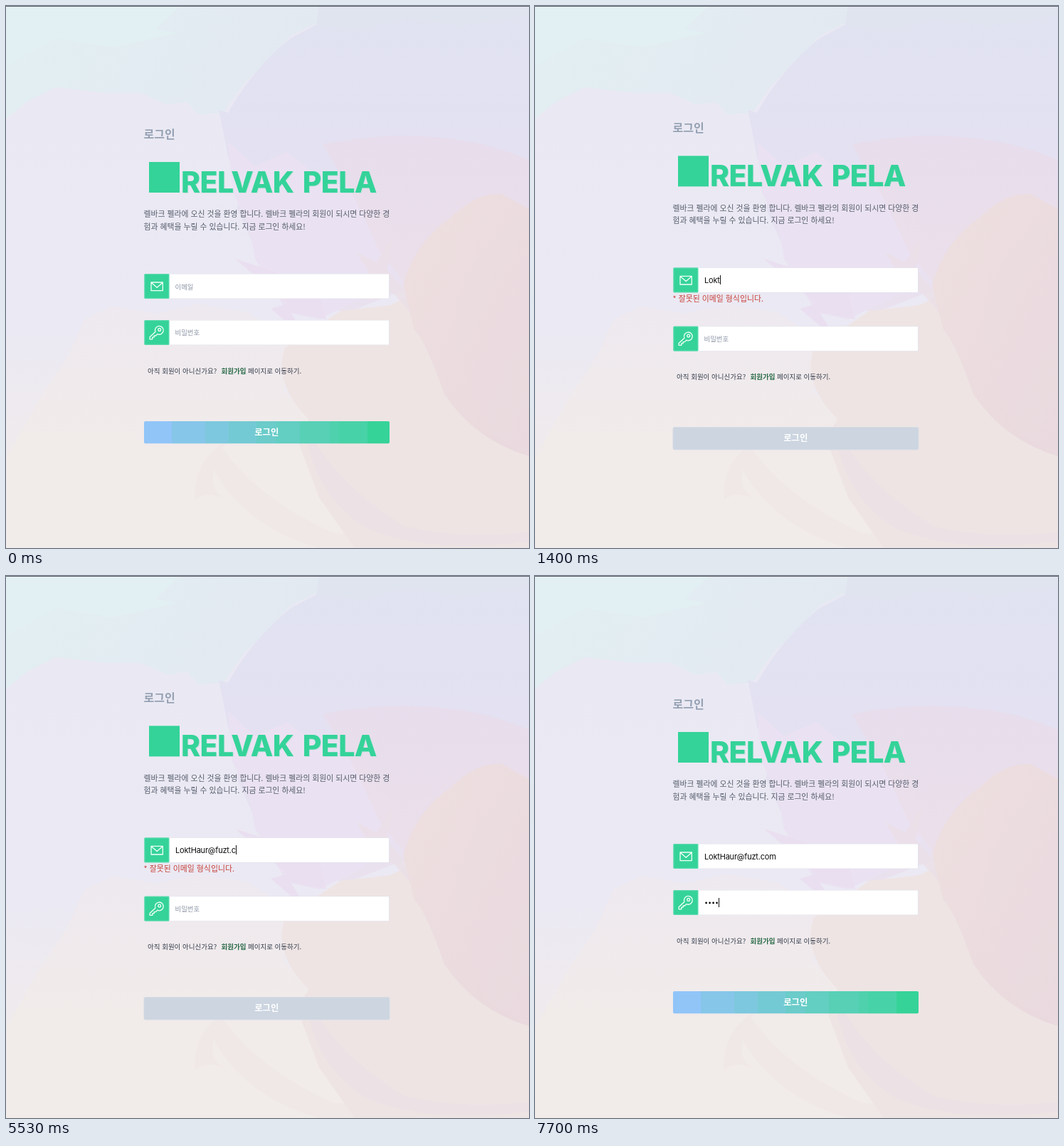
Write an HTML page that moves like this. It is 735 px wide and 761 px high and loops after 8 s.

```html
<!DOCTYPE html>
<html lang="ko">
<head>
<meta charset="utf-8">
<title>로그인</title>
<style>
  html, body { margin: 0; width: 100%; height: 100%; overflow: hidden; background: #ebe9f3; }
  svg { display: block; width: 100vw; height: 100vh; }
  text { font-family: "Noto Sans CJK KR", "Noto Sans CJK", sans-serif; white-space: pre; }
  .title { font-size: 16px; font-weight: 700; fill: #94a0b3; }
  .brand { font: 800 41px Inter, sans-serif; letter-spacing: -.6px; word-spacing: 4px; }
  .body { font-size: 10.85px; fill: #555d6c; }
  .hint { font-size: 9.4px; fill: #8b94a5; }
  .typed { font: 11px Inter, sans-serif; letter-spacing: -.2px; fill: #0c0c0e; }
  .error { font-size: 10.9px; fill: #c8423a; }
  .note { font-size: 9.5px; fill: #343c4a; }
  .link { font-weight: 700; fill: #286a46; }
  .submit { font-size: 12.4px; font-weight: 700; fill: #fff; text-anchor: middle; }
  .icon { fill: none; stroke: #f2fffa; stroke-width: 1.3; stroke-linejoin: round; stroke-linecap: round; }
</style>
</head>
<body>
<svg viewBox="0 0 735 761" preserveAspectRatio="none">
  <defs>
    <linearGradient id="base" x1="0" y1="0" x2="0" y2="1">
      <stop offset=".15" stop-color="#eae9f3"/>
      <stop offset=".6" stop-color="#ebe9f3"/>
      <stop offset=".85" stop-color="#f0ebec"/>
    </linearGradient>
    <linearGradient id="sky" x1="0" y1="0" x2="1" y2=".2">
      <stop offset="0" stop-color="#e2eff2"/>
      <stop offset="1" stop-color="#e3e9f1"/>
    </linearGradient>
    <linearGradient id="violet" x1="0" y1="0" x2="0" y2="1">
      <stop offset="0" stop-color="#e1e3f1"/>
      <stop offset=".45" stop-color="#e3e1f2"/>
      <stop offset="1" stop-color="#eae1ee"/>
    </linearGradient>
    <linearGradient id="rose" x1="0" y1="0" x2="0" y2="1">
      <stop offset="0" stop-color="#e9dcea"/>
      <stop offset="1" stop-color="#ebdfe9"/>
    </linearGradient>
    <linearGradient id="blob" x1="0" y1="0" x2="1" y2="1">
      <stop offset="0" stop-color="#eedfe0"/>
      <stop offset="1" stop-color="#e9d9de"/>
    </linearGradient>
    <linearGradient id="floor" x1="0" y1="0" x2="0" y2="1">
      <stop offset="0" stop-color="#eee9f0"/>
      <stop offset=".55" stop-color="#f1ebea"/>
    </linearGradient>
    <linearGradient id="bands"></linearGradient>
  </defs>

  <g id="backdrop">
    <rect width="735" height="761" fill="url(#base)"/>
    <path fill="url(#sky)" d="M0 0H444L436 24L400 42L372 72L335 108L305 150L270 152L255 135L225 138L190 122L140 122L70 114L30 134L0 158Z"/>
    <path fill="#e2f0f3" d="M0 0H245L210 32L240 38L150 58L70 45L0 84Z"/>
    <path fill="url(#violet)" d="M444 22L400 45Q345 90 312 150L299 146L306 180L312 212L330 250L325 285L345 330L380 365L420 420L480 430L570 395L735 300V0H446Z"/>
    <path fill="#dfe4ef" d="M440 0H735V12L640 28L560 16L500 34L436 26Z"/>
    <path fill="#eae2f2" d="M312 190L350 225L395 205L440 240L500 260L555 330L545 370L500 410L440 440L395 430L350 355L342 310L318 260Z"/>
    <path fill="url(#rose)" d="M445 194Q520 178 600 184Q670 188 735 216V300Q690 250 600 320L560 388L525 345L490 270Z" opacity=".8"/>
    <path fill="url(#floor)" d="M0 635L48 550L88 490L110 440L150 421L210 432L270 418L340 430L400 470L390 540L450 600L735 640V761H0Z"/>
    <path fill="#eee4e4" d="M392 480Q375 530 425 580L410 610L440 690L490 761H735V480L580 400L540 420L470 428Z"/>
    <path fill="url(#blob)" d="M558 392Q575 330 626 296Q660 262 696 264L735 285V632Q660 610 616 545Q590 470 574 455Z"/>
    <path fill="#ecdce1" d="M735 290Q660 330 640 410Q622 500 680 600L735 632Z" opacity=".6"/>
    <path fill="#eadff0" d="M322 355L375 372L440 400L450 440L400 430L425 470L372 425L395 418Z"/>
    <path fill="#ece0e8" d="M492 345L520 360L545 322L535 370L560 400L568 430L545 404L520 392Z" opacity=".8"/>
    <path fill="#efe6e6" d="M266 694Q262 640 310 610Q270 680 312 692Q276 680 266 694ZM300 615Q350 690 460 740L735 752V761H440Q330 730 286 640Z" opacity=".5"/>
    <path fill="#ece0e4" d="M420 585Q460 670 560 730Q640 750 735 738V752Q600 770 510 735Q430 690 420 585Z" opacity=".6"/>
    <rect width="735" height="1" fill="#65666c"/>
  </g>

  <g id="upper">
    <text class="title" x="193.5" y="186">로그인</text>
    <rect x="201" y="219" width="43" height="43" fill="#34d399"/>
    <text class="brand" x="247" y="263" fill="#cfdfe3">RELVAK PELA</text>
    <text class="brand" x="246" y="262" fill="#34d399">RELVAK PELA</text>
    <text class="body" x="193.5" y="296.3">렐바크 펠라에 오신 것을 환영 합니다. 렐바크 펠라의 회원이 되시면 다양한 경</text>
    <text class="body" x="193.5" y="313.5">험과 혜택을 누릴 수 있습니다. 지금 로그인 하세요!</text>
    <g class="field" transform="translate(194 376)"></g>
    <path class="icon" d="M204 388H220.3V399.6H204ZM204.3 388.4L212.2 395.2L220 388.4"/>
    <text class="hint" id="mailHint" x="237.5" y="397.5">이메일</text>
    <text class="typed" id="mail" x="238" y="397.7"></text>
    <path id="pointer" d="M290.5 392.5Q292.5 392.5 292.5 394V402Q292.5 403.5 290.5 403.5M294.5 392.5Q292.5 392.5 292.5 394M292.5 402Q292.5 403.5 294.5 403.5" fill="none" stroke="#222"/>
    <text class="error" id="error" x="193.5" y="423.6">* 잘못된 이메일 형식입니다.</text>
  </g>

  <g id="lower">
    <g class="field" transform="translate(194 441)"></g>
    <g class="icon" transform="translate(-.3 -.6)">
      <path d="M210.2 458.2L202.4 465.4V468.4H206V465.8H208.4V463.6H210.8L213 461.2A5.9 5.9 0 1 0 210.2 458.2Z"/>
      <circle cx="216" cy="455" r="1.9"/>
    </g>
    <text class="hint" id="passHint" x="237.5" y="462.3">비밀번호</text>
    <g id="dots" fill="#111"></g>
    <text class="note" x="199" y="515.6">아직 회원이 아니신가요?</text>
    <text class="note link" x="302.5" y="515.6">회원가입</text>
    <text class="note" x="340" y="515.6">페이지로 이동하기.</text>
    <rect id="button" x="194" y="583" width="345" height="31.3" rx="2"/>
    <text class="submit" x="366.3" y="602.7">로그인</text>
  </g>
  <rect id="caret" width="1" height="13" fill="#111"/>
</svg>

<script>
const LOOP = 8000, SHIFT = 8.6;
const EMAIL = "LoktHaur@fuzt.com";
const MAIL_KEYS = [350, 840, 1120, 1400, 2450, 2870, 2940, 3080, 3500, 4130,
                   4270, 4550, 5180, 5390, 5530, 5740, 5880];
const PASS_KEYS = [6650, 6930, 7350, 7700];
const CARET_OFF = [[0, 350], [1960, 2450], [4060, 4130], [5040, 5180]];
const INVALID = [350, 5740], POINTER = [70, 350], PASS_FOCUS = 6160;

const $ = id => document.getElementById(id);
const within = (t, [a, b]) => t >= a && t < b;
const count = (keys, t) => keys.filter(k => k <= t).length;
const show = (id, on) => $(id).setAttribute("visibility", on ? "visible" : "hidden");
const shift = (id, y) => $(id).setAttribute("transform", `translate(0 ${y})`);

document.querySelectorAll(".field").forEach(g => {
  g.innerHTML = `
    <rect x=".5" y="0" width="344.5" height="35" rx="1" fill="#e3e4ec"/>
    <rect x="35" y=".5" width="309" height="34" fill="#fff"/>
    <rect x=".5" y=".2" width="34.8" height="34.6" rx="1" fill="#35d399"/>
    <rect x="1" y=".7" width="33.8" height="33.6" rx="1" fill="none" stroke="#5adbb0"/>`;
});

// Hard-edged colour bands of the button: [right edge, colour]
const bands = [[233, "#91c5f8"], [280, "#86c6e9"], [313, "#7dc8de"], [352, "#74cad4"], [380, "#6bccca"],
               [413, "#63cec2"], [455, "#57d0b6"], [468, "#4fd1ad"], [508, "#48d2a8"], [539, "#36d399"]];
let left = 194;
$("bands").innerHTML = bands.map(([right, color]) => {
  const stops = [left, right].map(x => `<stop offset="${(x - 194) / 345}" stop-color="${color}"/>`).join("");
  left = right;
  return stops;
}).join("");

$("dots").innerHTML = PASS_KEYS.map((_, i) => `<circle cx="${240.6 + 5 * i}" cy="459" r="1.4"/>`).join("");

function render(t) {
  const typed = count(MAIL_KEYS, t), hidden = count(PASS_KEYS, t);
  const invalid = within(t, INVALID), onPass = t >= PASS_FOCUS;
  const move = invalid ? SHIFT : 0;

  shift("upper", -move);
  shift("lower", move);
  show("error", invalid);
  show("pointer", within(t, POINTER));
  show("mailHint", !typed);
  show("passHint", !hidden);
  $("mail").textContent = EMAIL.slice(0, typed);
  [...$("dots").children].forEach((dot, i) => dot.setAttribute("visibility", i < hidden ? "visible" : "hidden"));

  const button = $("button");
  button.setAttribute("fill", invalid ? "#ccd5e0" : "url(#bands)");
  button.setAttribute("stroke", invalid ? "#d5dbe5" : "none");

  const x = onPass ? 238 + 5 * hidden : 238 + (typed ? $("mail").getComputedTextLength() : 0);
  $("caret").setAttribute("x", Math.round(x));
  $("caret").setAttribute("y", onPass ? 452 : invalid ? 378 : 387);
  show("caret", !CARET_OFF.some(span => within(t, span)));
}

const start = performance.now();
function tick() {
  render((performance.now() - start) % LOOP);
  requestAnimationFrame(tick);
}
tick();
</script>
</body>
</html>
```
